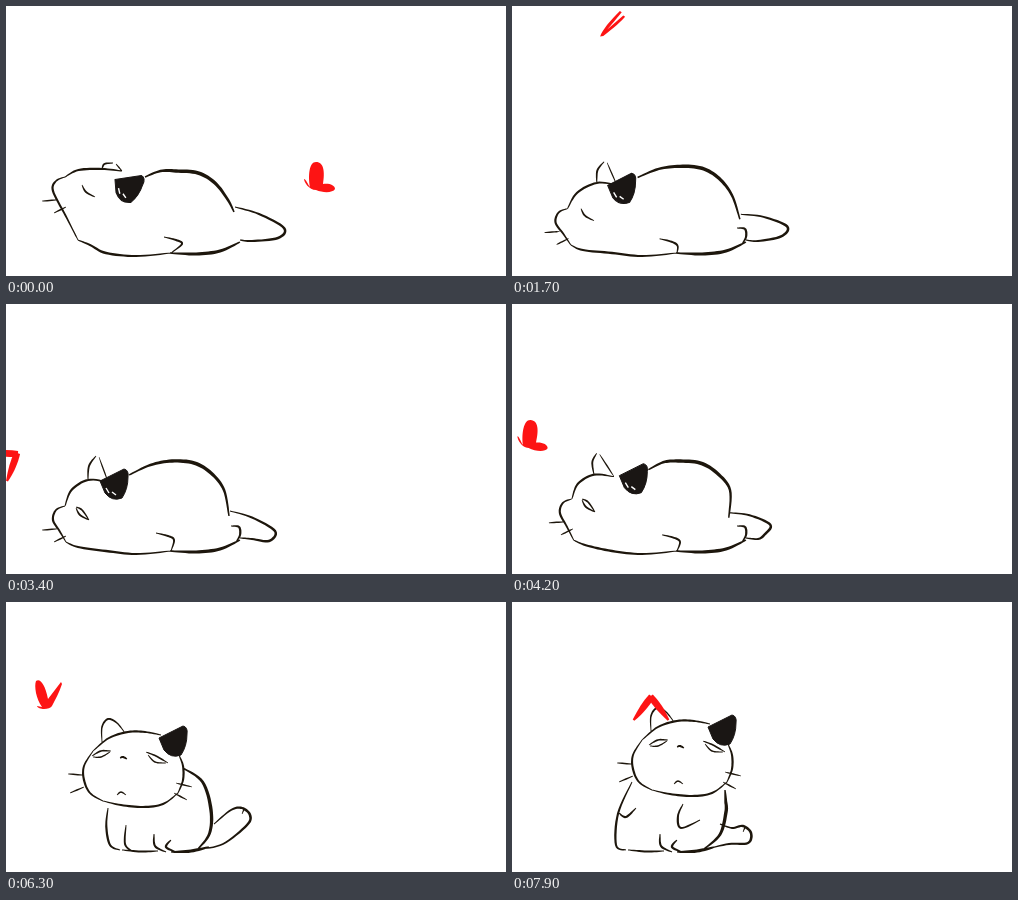
An HTML page for the animation above (8 s loop, 500 px wide and 270 px high).

```html
<!DOCTYPE html>
<html lang="en">
<head>
<meta charset="utf-8">
<title>Cat and butterfly</title>
<style>
  html, body { margin: 0; width: 100%; height: 100%; overflow: hidden; background: #fff; }
  svg { display: block; width: 100vw; height: 100vh; }
</style>
</head>
<body>
<svg viewBox="0 0 500 270">
  <path id="ink" fill="#1d160c"/>
  <g id="patch">
    <path d="M-15-4L9-16Q14-15 13-8Q13 4 7 13Q-3 17-10 8Z" fill="#1a1614" stroke="#1a1614" stroke-linejoin="round"/>
    <path id="glint" d="M-9 3L-6 8M-3 7L1 10" stroke="#fff" stroke-width="1.4"/>
  </g>
  <g id="butterfly" fill="#fd1414">
    <path id="wingA"/>
    <path id="wingB"/>
  </g>
</svg>
<script>
const LOOP = 8000, STEP = 100, SIT_UP = 4300, ARMS_OUT = 7100;
const el = id => document.getElementById(id);

// Anchor points of the sleeping cat; every stroke is derived from them.
const lying = [
  { t: 0, snout: [47, 185], crown: [96, 163], chin: [72, 234], earTip: [107, 157], patch: [122, 182],
    nape: [139, 171], back: [170, 165], hip: [228, 206], tail: [278, 222], eye: [80, 186], paw: [158, 231], tilt: [18] },
  { t: 1000, snout: [44, 210], crown: [90, 173], chin: [62, 236], earTip: [100, 154], patch: [115, 182],
    nape: [130, 168], back: [168, 159], hip: [227, 212], tail: [276, 213], eye: [73, 204], paw: [148, 231], tilt: [6] },
  { t: 2600, snout: [43, 225], crown: [78, 182], chin: [55, 243], earTip: [82, 158], patch: [105, 185],
    nape: [120, 176], back: [168, 162], hip: [229, 215], tail: [274, 230], eye: [73, 217], paw: [147, 235], tilt: [-8] },
  { t: 3400, snout: [47, 216], crown: [82, 176], chin: [60, 238], earTip: [90, 152], patch: [109, 181],
    nape: [123, 171], back: [166, 157], hip: [223, 212], tail: [269, 227], eye: [74, 211], paw: [150, 229], tilt: [0] },
  { t: SIT_UP, snout: [48, 208], crown: [82, 170], chin: [62, 236], earTip: [84, 149], patch: [124, 175],
    nape: [138, 165], back: [166, 157], hip: [216, 214], tail: [257, 220], eye: [74, 202], paw: [150, 231], tilt: [0] }
];
// Anchor points of the sitting cat; "look" shifts the face inside the head.
const sitting = [
  { t: SIT_UP, head: [98, 200], look: [-5], nape: [148, 160], waist: [208, 214], tail: [255, 216], shoulder: [84, 238] },
  { t: 5200, head: [101, 198], look: [-4], nape: [153, 160], waist: [206, 214], tail: [241, 210], shoulder: [87, 237] },
  { t: 6300, head: [127, 167], look: [0], nape: [177, 166], waist: [205, 208], tail: [244, 213], shoulder: [102, 206] },
  { t: 7900, head: [170, 156], look: [8], nape: [213, 188], waist: [214, 210], tail: [239, 231], shoulder: [120, 180] }
];
const flight = [
  { t: 0, at: [313, 170], turn: [0] }, { t: 1000, at: [221, 79], turn: [25] },
  { t: 1700, at: [100, 18], turn: [8] }, { t: 2600, at: [30, 47], turn: [0] },
  { t: 2900, at: [-20, 105], turn: [20] }, { t: 3400, at: [0, 157], turn: [57] },
  { t: 3800, at: [-16, 160], turn: [20] }, { t: 4500, at: [48, 108], turn: [-8] },
  { t: 5200, at: [58, 82], turn: [-15] }, { t: 6300, at: [42, 92], turn: [0] },
  { t: 6800, at: [46, 100], turn: [0] }, { t: 7900, at: [139, 108], turn: [0] }
];
const wings = {
  open: 'M-9 11C-11 0-10-14-3-14C5-14 6-4 4 8C10 7 16 9 16 13C14 17 4 17-3 14C-10 14-15 6-15 3C-13 3-11 9-9 11Z',
  vee: 'M-6 13C-12 5-14-8-12-13C-8-16-3-10 0 5L13-12L14-10C11-1 7 6 4 12C2 16-10 16-11 12Z',
  slim: 'M-10 14C-9 8-2-4 6-14L8-13C3-5-1 2-4 6L10-10L12-9C6 0-2 8-7 13Z',
  down: 'M-3-1L3-1C4 8 4 16 1 29L-1 29C-3 18-4 8-3-1Z'
};
const FLAPS = ['open', 'open', 'slim', 'down', 'open', 'slim', 'open', 'down', 'slim'];
const SPREAD = 37;

const mix = (a, b, k) => a.map((v, i) => v + (b[i] - v) * k);
const by = (p, dx, dy) => [p[0] + dx, p[1] + dy];
const mid = (a, b, dx = 0, dy = 0) => by(mix(a, b, .5), dx, dy);

function poseAt(keys, t) {
  const i = Math.max(1, keys.findIndex(key => key.t >= t));
  const a = keys[i - 1], b = keys[i], k = (t - a.t) / (b.t - a.t), pose = {};
  for (const name in a) if (name !== 't') pose[name] = mix(a[name], b[name], k);
  return pose;
}

// Catmull-Rom curve through the points.
function spline(points) {
  const last = points.length - 1, curve = [];
  const at = i => points[Math.max(0, Math.min(last, i))];
  for (let i = 0; i < last; i++) {
    const p = at(i - 1), q = at(i), r = at(i + 1), s = at(i + 2);
    for (let u = 0; u < 1; u += .125) {
      curve.push(q.map((v, c) => {
        const slope = r[c] - p[c];
        const bend = 2 * p[c] - 5 * v + 4 * r[c] - s[c];
        const twist = 3 * (v - r[c]) + s[c] - p[c];
        return v + u / 2 * (slope + u * (bend + u * twist));
      }));
    }
  }
  curve.push(points[last]);
  return curve;
}

// A line that swells in the middle and thins out at both ends.
function brush(width, ...points) {
  const line = spline(points), last = line.length - 1, left = [], right = [];
  line.forEach(([x, y], i) => {
    const a = line[Math.max(0, i - 1)], b = line[Math.min(last, i + 1)];
    const dx = b[0] - a[0], dy = b[1] - a[1], length = Math.hypot(dx, dy) || 1;
    const half = width / 2 * (.4 + .6 * Math.sin(Math.PI * i / last));
    const nx = -dy / length * half, ny = dx / length * half;
    left.push([x + nx, y + ny]);
    right.unshift([x - nx, y - ny]);
  });
  return 'M' + [...left, ...right].map(p => p.map(v => v.toFixed(1)).join(' ')).join('L') + 'Z';
}

// A stroke whose points are given relative to an origin.
const around = (origin, width, ...offsets) => brush(width, ...offsets.map(o => by(origin, ...o)));

function lyingInk(p, t) {
  const { snout, crown, chin, earTip, nape, back, hip, tail, eye, paw } = p;
  const bridge = by(snout, 12, -14), earEnd = by(crown, 20, 2);
  const strokes = [
    brush(2.3, bridge, mid(bridge, crown, -5, -3), crown, earEnd),
    brush(2.2, bridge, by(snout, 3, -10), snout, mid(snout, chin), chin),
    brush(1.9, crown, mid(crown, earTip, -3, -2), earTip),
    brush(1.3, by(earTip, 3, 1), earEnd),
    brush(3.6, nape, mid(nape, back, 0, -3), back, by(back, 22, 2), by(back, 39, 12), by(back, 52, 29), hip),
    brush(2.6, by(hip, 1, -5), mid(hip, tail, 0, -6), tail, by(tail, -6, 10), [246, 235], [234, 234]),
    brush(2.4, chin, by(chin, 12, 5), [100, 247], [130, 250], [165, 247]),
    brush(3.3, [164, 247], [190, 248], [214, 245], [234, 236]),
    brush(2.1, paw, by(paw, 12, 3), by(paw, 18, 7), [165, 247]),
    around(eye, 1.8, [-4, -7], [0, 0], [9, 5]),
    around(snout, 1.5, [-11, 10], [4, 9]),
    around(snout, 1.5, [1, 22], [13, 16])
  ];
  if (t > 500) strokes.push(brush(2.3, [225, 222], [233, 223], [234, 231], [230, 238]));
  if (t > 3000) strokes.push(around(eye, 1.8, [-4, -8], [2, -5], [9, 5]));
  return strokes.join('');
}

function sittingInk(p, t) {
  const { head, look, nape, waist, tail, shoulder } = p;
  const face = by(head, look[0], 0), lean = waist[0] - nape[0], knee = [104, 243];
  const strokes = [
    around(head, 2.3, [-40, -18], [-24, -31], [-5, -37], [12, -37], [28, -34]),
    around(head, 2.2, [-40, -18], [-49, -3], [-49, 11], [-43, 24], [-30, 32]),
    around(head, 2.3, [-30, 32], [-12, 36], [10, 38], [30, 35], [45, 24]),
    around(head, 2.2, [45, 24], [50, 11], [50, -3], [46, -14]),
    around(head, 1.9, [-31, -27], [-31, -42], [-25, -50], [-16, -46], [-8, -36]),
    around(face, 1.7, [-41, -13], [-32, -18], [-22, -18]),
    around(face, 1.5, [-40, -12], [-32, -12], [-23, -17]),
    around(face, 1.7, [13, -17], [23, -13], [35, -6]),
    around(face, 1.5, [15, -14], [22, -7], [33, -6]),
    around(face, 2.2, [-13, -11], [-10, -12], [-6, -10]),
    around(face, 1.6, [-16, 26], [-12, 23], [-7, 26]),
    around(head, 1.5, [-65, 5], [-50, 6]),
    around(head, 1.5, [-63, 24], [-49, 18]),
    around(head, 1.5, [43, 14], [59, 18]),
    around(head, 1.5, [41, 24], [54, 31]),
    brush(3.4, nape, mid(nape, waist, lean * .2, -lean * .25), waist, mid(waist, [192, 247], 5, 4), [192, 247]),
    brush(2.6, [208, 222], by(tail, -19, -5), by(tail, -8, -7), tail, by(tail, -3, 10), [217, 242], [194, 247]),
    around(tail, 1.5, [-8, -1], [-5, -6], [0, -2]),
    brush(2.3, shoulder, mid(shoulder, knee, (87 - shoulder[0]) * .18), knee, [114, 248]),
    brush(2, [116, 248], [135, 249.5], [152, 249]),
    brush(2.2, [148, 232], [149, 244], [160, 250]),
    brush(2.3, [165, 238], [160, 245], [170, 250]),
    brush(3.2, [165, 250], [185, 249], [203, 245])
  ];
  if (t >= ARMS_OUT) {
    strokes.push(brush(2.2, [107, 211], [114, 215], [124, 206]),
      brush(2.2, [171, 202], [166, 214], [169, 226], [188, 218]));
  } else strokes.push(brush(2, mid(shoulder, [130, 232], 4, 4), [119, 242], [126, 249]));
  return strokes.join('');
}

function drawCat(t) {
  const asleep = t < SIT_UP;
  const pose = poseAt(asleep ? lying : sitting, t);
  const [x, y] = asleep ? pose.patch : by(pose.head, 41, -27);
  el('ink').setAttribute('d', asleep ? lyingInk(pose, t) : sittingInk(pose, t));
  el('patch').setAttribute('transform', `translate(${x} ${y}) rotate(${asleep ? pose.tilt : 0})`);
  el('glint').setAttribute('visibility', asleep ? 'visible' : 'hidden');
}

function drawButterfly(t) {
  const { at, turn } = poseAt(flight, t);
  const flap = FLAPS[t / STEP % FLAPS.length], lowered = flap === 'down';
  const shape = wings[flap === 'open' && t > SIT_UP ? 'vee' : flap];
  el('butterfly').setAttribute('transform', `translate(${at}) rotate(${turn})`);
  for (const [id, side] of [['wingA', 1], ['wingB', -1]]) {
    el(id).setAttribute('d', lowered || side > 0 ? shape : '');
    el(id).setAttribute('transform', lowered ? `translate(0 -13) rotate(${side * SPREAD})` : '');
  }
}

const start = performance.now();
function render() {
  const t = Math.floor((performance.now() - start) % LOOP / STEP) * STEP;
  drawCat(t);
  drawButterfly(t);
  requestAnimationFrame(render);
}
render();
</script>
</body>
</html>
```
